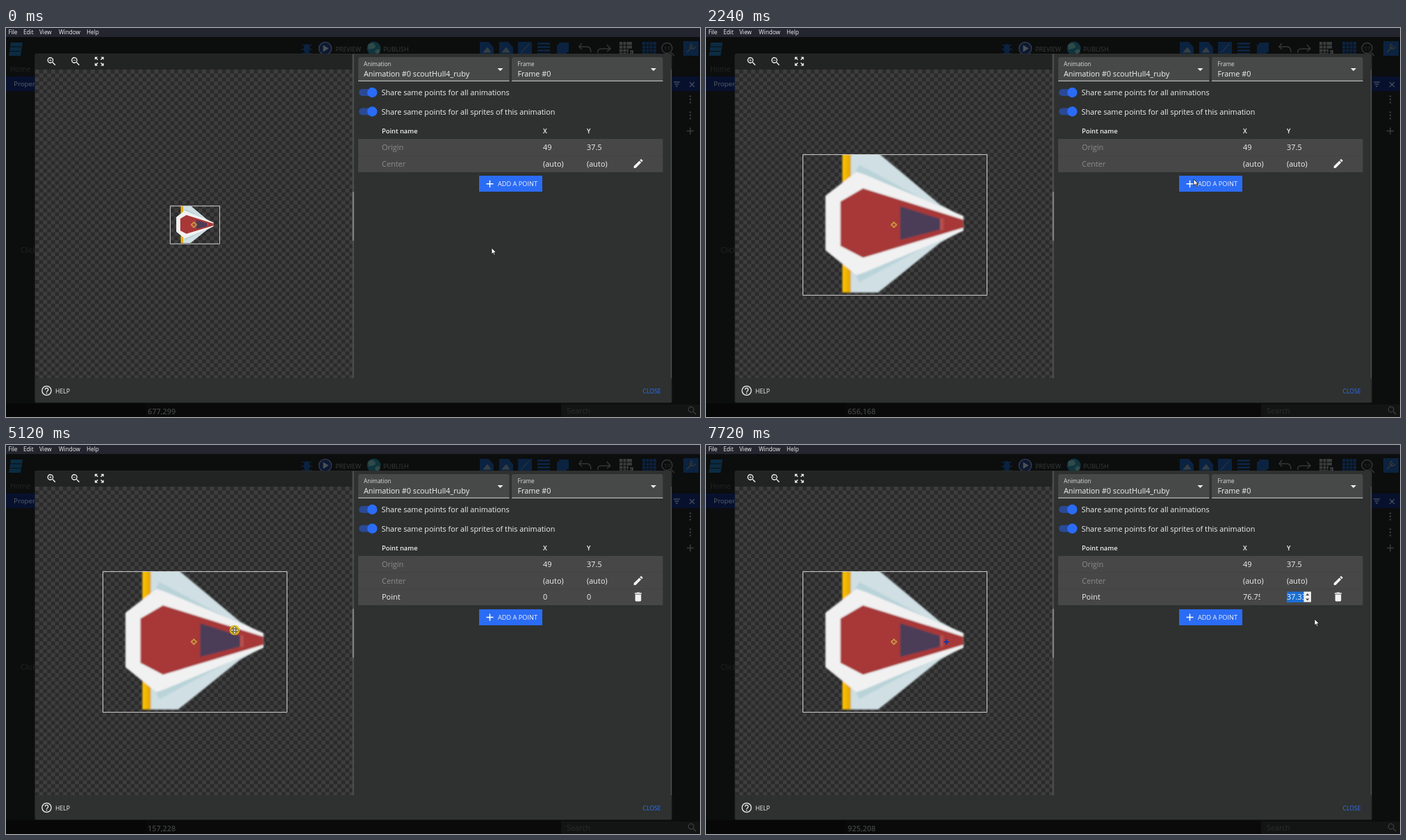
These frames come from a looping animation (999x561 px, 8000 ms). An HTML page:

```html
<!DOCTYPE html>
<html lang="en">
<head>
<meta charset="utf-8">
<title>Point editor</title>
<style>
  html, body { margin: 0; height: 100%; overflow: hidden; background: #0c0d0d; }
  svg { display: block; width: 999px; height: 561px; font-family: "Open Sans", "Noto Sans", sans-serif; font-size: 10.82px; fill: #f2f2f2; }
  .menu { font-size: 8.2px; }
  .cell { font-size: 10.95px; }
  .head { font-size: 9.3px; font-weight: 600; }
  .label { font-size: 8.2px; fill: #dcdcdc; }
  .btn { font-size: 8.7px; }
  .tool { font-size: 9px; }
  .off { fill: #8c8c8c; }
  .dim { fill: #3a3d3d; }
  .blue { fill: #0b2340; }
  .line { fill: none; stroke: #343737; stroke-width: 1.5; }
</style>
</head>
<body>
<svg viewBox="0 0 999 561">
  <defs>
    <pattern id="checker" x="42" y="60" width="11.446" height="11.446" patternUnits="userSpaceOnUse">
      <rect width="11.446" height="11.446" fill="#2b2b2b"/>
      <path d="M0 0h5.723v5.723H0zM5.723 5.723h5.723v5.723H5.723z" fill="#3e3e3e"/>
    </pattern>
    <linearGradient id="gold"><stop stop-color="#ffc800"/><stop offset="1" stop-color="#dfa000"/></linearGradient>
    <filter id="soft"><feGaussianBlur stdDeviation=".3"/></filter>
    <clipPath id="canvas"><rect width="98" height="75"/></clipPath>
    <clipPath id="button"><rect x="681" y="213" width="91" height="23.3"/></clipPath>
    <clipPath id="fieldX"><rect x="770" y="208" width="27.7" height="24"/></clipPath>
    <clipPath id="fieldY"><rect x="833" y="208" width="27.7" height="24"/></clipPath>
    <path id="lens" d="M15.5 14h-.8l-.3-.3A6.5 6.5 0 1 0 13.7 14.4l.3.3v.8l5 5 1.5-1.5zm-6 0a4.5 4.5 0 1 1 0-9 4.5 4.5 0 0 1 0 9z"/>
    <g id="toggle">
      <rect x="508" y="88" width="25" height="10" rx="5" fill="#2a4a96"/>
      <circle cx="527.2" cy="93" r="7.2" fill="#2b6cf6"/>
    </g>
  </defs>

  <!-- dimmed editor behind the dialog -->
  <rect width="999" height="561" fill="#0c0d0d"/>
  <rect width="999" height="13" fill="#24262f"/>
  <g class="menu">
    <text x="3.5" y="9">File</text><text x="25" y="9">Edit</text><text x="48" y="9">View</text>
    <text x="76" y="9">Window</text><text x="116" y="9">Help</text>
  </g>
  <path d="M7 21h17l-3 19H4z" fill="#0b2c42"/>
  <path d="M5 27h17M5 33.5h16" stroke="#0c0d0d"/>
  <g class="blue">
    <ellipse cx="433" cy="30" rx="4.5" ry="7"/>
    <path d="M426 24h14v1.5h-14zM425 30h16v1.5h-16zM426 36h14v1.5h-14z"/>
    <path d="M682 20h13l7 8v11h-20zM710 20h13l7 8v11h-20zM737 20h20v19h-20zM765 21h18v3h-18zM765 26h18v3h-18zM765 31h18v3h-18zM765 36h18v2h-18zM793 24h14v14h-14zM796 21h14v14h-3V24h-11z"/>
    <path d="M916 20h20v19h-20zM975 19h22v21h-22z"/>
  </g>
  <path d="M687 35l6-7 5 7zM714 35l6-7 5 7zM741 36l12-13" stroke="#343e44" fill="#343e44"/>
  <path d="M921 20v19M926 20v19M931 20v19M916 25h20M916 30h20M916 35h20" stroke="#0c0d0d"/>
  <path d="M980 35l9-9M988 23a3.5 3.5 0 1 0 4 4" class="line"/>
  <circle cx="459.5" cy="29.5" r="9" fill="#0e1830" stroke="#2f3b50" stroke-width="1.5"/>
  <path d="M456.5 24.5l8 5-8 5z" fill="#4a5058"/>
  <circle cx="529.5" cy="29.5" r="10" fill="#10343e"/>
  <path d="M521 24q7-5 10 0t-4 6-5 2zM531 33q5-5 7-1t-5 6z" fill="#2f4a49"/>
  <g class="tool dim"><text x="474" y="33.5">PREVIEW</text><text x="543" y="33.5">PUBLISH</text></g>
  <path class="line" d="M829 22l-4 5 4 4M826 27h10q6 0 6 8M865 24l5 6-5 4M869 30h-12q-6 0-5 6"/>
  <path class="dim" d="M883 20h18v10h-5v9h-13zM898 32h5v5h-5z"/>
  <path d="M888 20v19M893 20v19M883 25h18M883 30h18M883 35h18" stroke="#0c0d0d"/>
  <circle class="line" cx="951.5" cy="29" r="7.5"/><path class="line" d="M957 35l5 5"/>
  <text class="dim" style="font-size:7px" x="947" y="32">1:1</text>
  <text x="6" y="62.5" fill="#242626" style="font-size:10.3px">Home</text>
  <path d="M0 70h999v21H0z" fill="#07112e"/>
  <text x="11" y="84" fill="#5a5f6a" style="font-size:9.8px">Properties</text>
  <path d="M961 78h9M962.5 81h6M964 84h3M984 78l7 7M991 78l-7 7" stroke="#444a58" stroke-width="1.3"/>
  <g class="dim">
    <circle cx="985" cy="98.5" r="1.3"/><circle cx="985" cy="103" r="1.3"/><circle cx="985" cy="107.5" r="1.3"/>
    <circle cx="985" cy="121.5" r="1.3"/><circle cx="985" cy="126" r="1.3"/><circle cx="985" cy="130.5" r="1.3"/>
    <path d="M984.3 143.5h1.5v4.3h4.3v1.5h-4.3v4.3h-1.5v-4.3H980v-1.5h4.3z"/>
  </g>
  <text x="21" y="324" fill="#222424">Click</text>
  <rect y="541" width="201" height="20" fill="#070707"/>
  <rect x="201" y="541" width="598" height="20" fill="#0a0a0a"/>
  <rect x="799" y="543" width="200" height="18" fill="#131414"/>
  <text x="807" y="555.5" fill="#2c2e2e">Search</text>
  <use href="#lens" transform="translate(979.5 543.5) scale(.7)" class="dim"/>
  <text id="status" x="204" y="557" fill="#404242" style="font-size:10.9px;font-weight:600"></text>

  <!-- dialog -->
  <rect x="41.5" y="37" width="917" height="503.5" rx="2" fill="#2e3130"/>
  <rect x="42" y="37.5" width="457" height="22.5" fill="#222323"/>
  <rect x="42" y="60" width="457" height="445" fill="url(#checker)"/>
  <rect x="498.5" y="37.5" width="2.5" height="467.5" fill="#494c4b"/>
  <rect x="498.8" y="236" width="2" height="71" rx="1" fill="#858887"/>
  <rect x="957" y="60" width="1" height="445" fill="#555857"/>
  <g transform="translate(57.5 40) scale(.68)"><use href="#lens"/><path d="M12 10h-2v2H9v-2H7V9h2V7h1v2h2z"/></g>
  <g transform="translate(92 40) scale(.68)"><use href="#lens"/><path d="M7 9h5v1H7z"/></g>
  <path transform="translate(125.7 39.5) scale(.715)" d="M15 3l2.3 2.3-2.9 2.9 1.4 1.4 2.9-2.9L21 9V3zM3 9l2.3-2.3 2.9 2.9 1.4-1.4-2.9-2.9L9 3H3zM9 21l-2.3-2.3 2.9-2.9-1.4-1.4-2.9 2.9L3 15v6zM21 15l-2.3 2.3-2.9-2.9-1.4 1.4 2.9 2.9L15 21h6z"/>
  <circle cx="58.5" cy="523" r="6.6" fill="none" stroke="#f2f2f2" stroke-width="1.3"/>
  <path d="M56.3 521.5a2.2 2.2 0 1 1 3.5 1.7q-1.3.8-1.3 2M58.5 526v1.4" fill="none" stroke="#f2f2f2" stroke-width="1.3"/>
  <text class="btn" x="71" y="526.5">HELP</text>
  <text class="btn" x="916.5" y="526.5" fill="#2f70f6">CLOSE</text>

  <path d="M507 76.5V45q0-3 3-3h211.500q3 0 3 3v31.500zM728 76.500V45q0-3 3-3h211.500q3 0 3 3v31.500z" fill="#474948"/>
  <path d="M507 76.3h217.5M728 76.3h217.5" stroke="#d6d6d6"/>
  <path d="M707.5 58h8l-4 4zM928 58h8l-4 4z"/>
  <text class="label" x="515" y="55">Animation</text><text x="515" y="70">Animation #0 scoutHull4_ruby</text>
  <text class="label" x="736.5" y="55">Frame</text><text x="736.5" y="70">Frame #0</text>
  <use href="#toggle"/><text x="540.5" y="97">Share same points for all animations</text>
  <use href="#toggle" y="27.5"/><text x="540.5" y="124.5">Share same points for all sprites of this animation</text>
  <g class="head"><text x="541" y="152">Point name</text><text x="773" y="152">X</text><text x="836" y="152">Y</text></g>
  <rect x="507" y="160" width="438.5" height="48" fill="#474747"/>
  <path d="M507 183.8h438.5" stroke="#414241" stroke-width=".7"/>
  <g class="cell">
    <text class="off" x="541" y="175.7">Origin</text><text x="773" y="175.7">49</text><text x="836" y="175.7">37.5</text>
    <text class="off" x="541" y="199.5">Center</text><text x="773" y="199.5">(auto)</text><text x="836" y="199.5">(auto)</text>
  </g>
  <path transform="translate(901.6 187) scale(.715)" d="M3 17.250V21h3.750L17.800 9.900l-3.700-3.700zM20.700 7a1 1 0 0 0 0-1.400l-2.300-2.300a1 1 0 0 0-1.400 0l-1.900 1.800 3.800 3.800z"/>

  <g id="row" class="cell">
    <rect x="507" y="207.5" width="438.5" height="23.5" fill="#474747"/>
    <path d="M507 207.7h438.5" stroke="#414241" stroke-width=".7"/>
    <text x="541" y="222.7">Point</text>
    <path id="nameLine" d="M541 226.3h204" stroke="#f2f2f2" stroke-width="1.2"/>
    <path id="yLine" d="M836 227.5h35" stroke="#f2f2f2"/>
    <rect id="selection" x="836" y="211.5" width="25" height="15.5" fill="#1a6fd4"/>
    <g clip-path="url(#fieldX)"><text id="px" x="773" y="222.7"></text></g>
    <g clip-path="url(#fieldY)"><text id="py" x="836" y="222.7"></text></g>
    <g id="spinner">
      <rect x="860.5" y="211.5" width="10.5" height="15" fill="#efefef"/>
      <path d="M863.3 217l2.5-3 2.5 3zM863.3 221.5l2.5 3 2.5-3z" fill="#444"/>
    </g>
    <path transform="translate(901.4 210.4) scale(.715)" d="M6 19a2 2 0 0 0 2 2h8a2 2 0 0 0 2-2V7H6zM19 4h-3.500l-1-1h-5l-1 1H5v2h14z"/>
  </g>

  <g id="add">
    <g clip-path="url(#button)">
      <rect x="681" y="213" width="91" height="23.3" fill="#2b6cf5"/>
      <circle id="ripple" cx="703" cy="218" fill="#fff"/>
    </g>
    <path d="M691.5 224.7h10M696.5 219.7v10" stroke="#fff" stroke-width="1.5"/>
    <text x="708" y="228.3" style="font-size:9.2px">ADD A POINT</text>
  </g>

  <!-- ship, 98 by 75 units -->
  <g id="ship">
    <g clip-path="url(#canvas)"><g filter="url(#soft)">
      <path d="M25 -1H40L73 26.7 85 33V40.500L73 47 40 73.600H25z" fill="#cfdfe4"/>
      <path d="M25.500 14L30 5.500 73 28.500 85 36.700 73 45 30 68 25.500 59z" fill="#b9d3d9"/>
      <path d="M21 -1h4.500v16H21zM21 58h4.500v15.600H21z" fill="url(#gold)"/>
      <path d="M12 22L28.500 9.200 33 10.700 85.500 32.800v7.800L33 62.700 28.500 64.300 12 51z" fill="#f1f1f1"/>
      <path d="M20 25L32 18 85.500 34.700V39L32 55 20 48.700z" fill="#a83838"/>
      <path d="M73 34h1.800v6.200h-1.800z" fill="#b9514f"/>
      <path d="M51.800 27.500L73 34.300V40L51.800 45.500z" fill="#4b3c58"/>
    </g></g>
    <rect width="98" height="75" fill="none" stroke="#d2d2d2" vector-effect="non-scaling-stroke"/>
  </g>
  <path d="M269.3 280.2h2.4v2.4h2.4v2.400h-2.400v2.400h-2.400v-2.400h-2.400v-2.400h2.400z" fill="none" stroke="#e2d24a" stroke-width=".9"/>
  <path id="point" d="M-3.8 0H3.8M0-3.8V3.8" stroke="#263593" stroke-width="2.2"/>

  <circle id="press" r="7.3" fill="#dcbc1c" fill-opacity=".9"/>
  <path id="arrow" d="M0 0V9.2L2.2 7.2 3.6 10.4 5.1 9.7 3.7 6.7H6.6z" fill="#fff" stroke="#151515" stroke-width=".8"/>
  <path id="beam" d="M-2-4.5H2M0-4.5V4.5M-2 4.5H2" fill="none" stroke="#0b0b0b"/>
  <path id="move" d="M0-5.8L2.3-3H.8V-.8H3V-2.3L5.8 0 3 2.3V.8H.8V3H2.3L0 5.8-2.3 3H-.8V.8H-3V2.3L-5.8 0-3-2.3V-.8H-.8V-3H-2.3z" fill="#fff" stroke="#222" stroke-width=".7"/>
</svg>
<script>
const $ = id => document.getElementById(id);
const show = (id, on) => { $(id).style.display = on ? '' : 'none'; };
const place = (id, x, y, s = 1) => $(id).setAttribute('transform', `translate(${x} ${y}) scale(${s})`);

const LOOP = 8000, CLICK = 2990, ADDED = 3060, GRAB = 4640, DROP = 6130, SELECT = 7160;

// pointer stops: time, x, y
const stops = [
  [330, 699, 317], [1010, 262, 322], [1690, 262, 322], [2170, 684, 223], [2240, 702, 218],
  [2350, 746, 222], [2450, 710, 219], [2650, 710, 219], [2720, 708, 219], [3200, 708, 219],
  [3270, 704, 220], [3550, 230, 168], [3760, 141, 181], [3820, 143, 178], [4310, 139, 182],
  [4580, 139, 182], [5050, 326, 266], [5120, 329, 267], [5470, 346, 284], [6330, 346, 284],
  [7090, 850, 219], [7230, 850, 219], [7480, 930, 240], [7650, 877, 251.5], [7720, 876, 251]
];

function pointer(t) {
  const i = stops.findIndex(s => s[0] > t);
  if (i === 0) return stops[0].slice(1);
  if (i < 0) return stops[stops.length - 1].slice(1);
  const [t0, x0, y0] = stops[i - 1], [t1, x1, y1] = stops[i];
  const p = (t - t0) / (t1 - t0), e = p * p * (3 - 2 * p);
  return [x0 + (x1 - x0) * e, y0 + (y1 - y0) * e];
}

const zoomAt = t => t < 1210 ? 0.727 : t < 1280 ? 1.52 : t < 1350 ? 2.03 : 2.704;

function draw(t) {
  const [x, y] = pointer(t);
  const added = t >= ADDED, dropped = t >= DROP, selected = t >= SELECT;

  const zoom = zoomAt(t);
  place('ship', 272 - 49 * zoom, 284 - 37.5 * zoom, zoom);

  // the coordinate readout trails the pointer a little
  const [lx, ly] = pointer(t - 70);
  $('status').textContent = Math.round((lx - 213.5) * 1.394) + ',' + Math.round((ly - 102.5) * 1.394);

  const [px, py] = t < GRAB ? [139, 182.5] : pointer(Math.min(t, DROP));
  place('point', px, py);
  show('point', added);

  const inRow = added && y > 210 && y < 230;
  const onName = inRow && x > 541 && x < 745;
  const onX = inRow && x > 772 && x < 808;
  const onY = inRow && x > 835 && x < 871;
  show('row', added);
  show('nameLine', onName);
  show('yLine', onY);
  show('selection', selected);
  show('spinner', selected || onY);
  $('px').textContent = dropped ? '76.75' : '0';
  $('py').textContent = dropped ? '37.33' : '0';
  place('add', 0, added ? 23.7 : 0);

  const p = Math.min(1, Math.max(0, (t - CLICK) / 550));
  const fade = Math.min(1, Math.max(0, (3720 - t) / 350));
  $('ripple').setAttribute('r', 70 * (1 - (1 - p) ** 1.6));
  $('ripple').setAttribute('opacity', 0.26 * fade);

  const dragging = t >= GRAB && !dropped;
  const kind = dragging || added && Math.hypot(x - px, y - py) < 7 ? 'move'
    : onName || onX || onY ? 'beam' : 'arrow';
  for (const k of ['arrow', 'beam', 'move']) {
    show(k, k === kind);
    place(k, x, y);
  }
  show('press', dragging || t >= CLICK && t < ADDED);
  place('press', x, y);
}

const start = performance.now();
function tick() {
  draw((performance.now() - start) % LOOP);
  requestAnimationFrame(tick);
}
tick();
</script>
</body>
</html>
```
